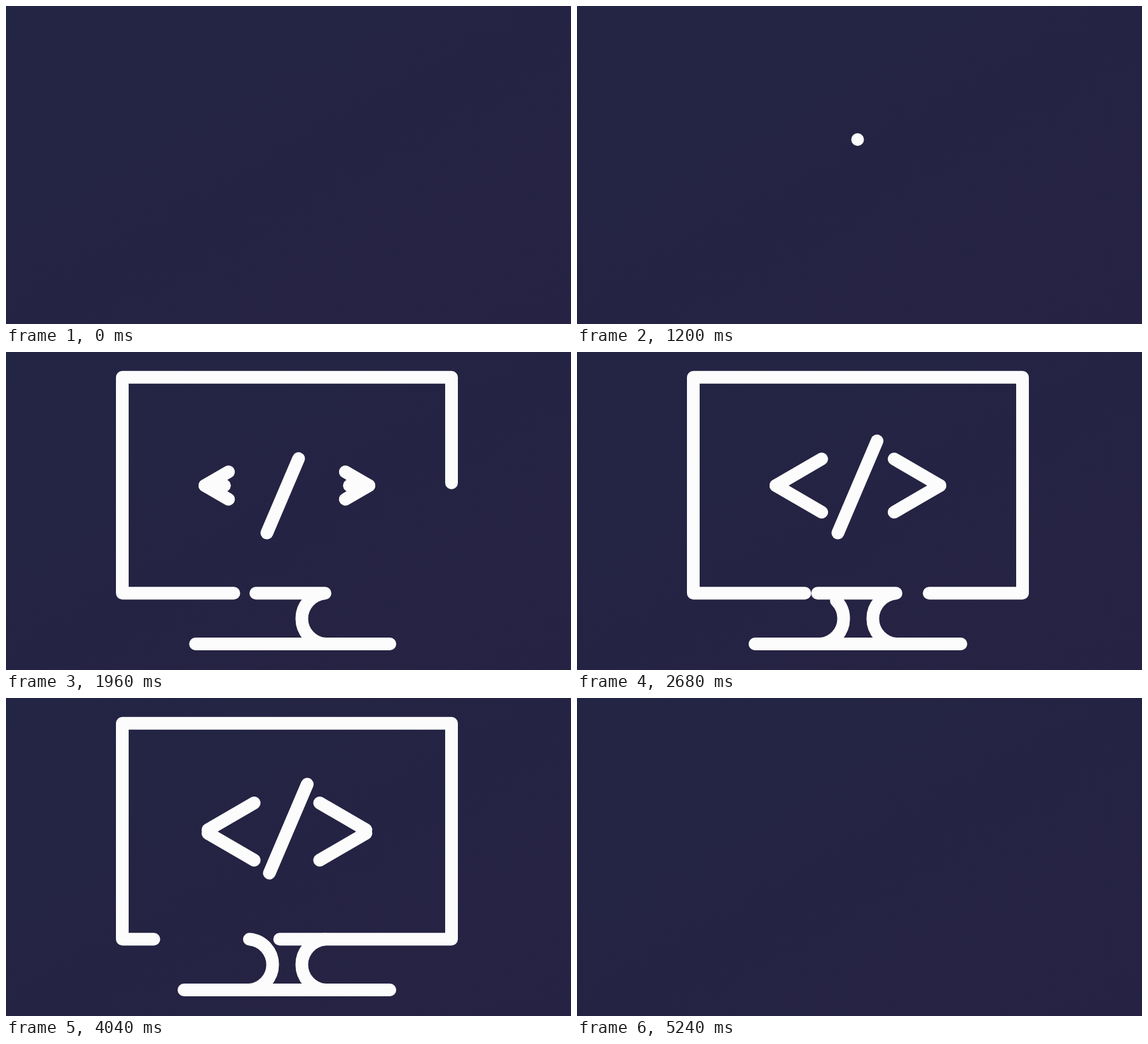
Recreate the animation shown at these times as an HTML page. Size 889 by 500 pixels, loop 6 s.

```html
<!DOCTYPE html>
<html lang="en">
<head>
<meta charset="utf-8">
<title>Code monitor</title>
<style>
  html, body { margin: 0; width: 100%; height: 100%; overflow: hidden; background: #252343; }
  svg { display: block; width: 100vw; height: 100vh; }
  .line { fill: none; stroke: #fcfcfc; stroke-width: 20; stroke-linecap: round; stroke-linejoin: round; }
</style>
</head>
<body>
<svg viewBox="0 0 889 500">
  <defs>
    <linearGradient id="bg" x1="0" y1="0" x2="1" y2="1">
      <stop offset="0" stop-color="#232544"/>
      <stop offset=".5" stop-color="#252343"/>
      <stop offset="1" stop-color="#262243"/>
    </linearGradient>
  </defs>
  <rect width="889" height="500" fill="url(#bg)"/>
  <circle id="dot" cy="210" r="10" fill="#fcfcfc"/>
  <g id="lines"></g>
</svg>
<script>
const LOOP = 6000, STEP = 40;
const DRAW = 1300, ERASE = 3280, SPAN = 1960;
const REST_X = 441.5, ENTER_X = 899;
const dot = document.getElementById('dot');
const group = document.getElementById('lines');

const clamp = x => Math.min(1, Math.max(0, x));
const curve = (s, a, b) => 3 * s * (1 - s) ** 2 * a + 3 * s * s * (1 - s) * b + s ** 3;

// Fast start, long settle
function easeOut(u) {
  if (u <= 0) return 0;
  if (u >= 1) return 1;
  let lo = 0, hi = 1;
  for (let i = 0; i < 24; i++) {
    const mid = (lo + hi) / 2;
    if (curve(mid, .12, .2) < u) lo = mid; else hi = mid;
  }
  return curve(lo, .4, 1);
}
const easeIn = u => 1 - easeOut(1 - u);
const bend = (p, k) => p + k * p * (1 - p);

function addLine(d, draw, erase) {
  const el = document.createElementNS('http://www.w3.org/2000/svg', 'path');
  el.setAttribute('class', 'line');
  el.setAttribute('d', d);
  group.append(el);
  return { el, len: el.getTotalLength(), draw, erase };
}

// draw(p, len) gives [from, to] along the path; erase(e, len) gives from
const simpleDraw = (p, len) => [0, len * bend(p, .12)];
const simpleErase = (e, len) => len * e;

const ARM = 129;
const armDraw = (p, len) => [ARM * p, len * bend(p, .13)];
const armErase = (e, len) => ARM + (len - ARM) * e;

const LEAD = 72;
function standDraw(p, len) {
  const q = p - 1.7 * (p * (1 - p)) ** 2;
  return [LEAD * (1 - p), LEAD + (len - LEAD) * q];
}

const lines = [
  addLine('M358.5 379.3H183V39.7H701V379.3H502', (p, len) => [0, len * p], (e, len) => len * bend(e, .33)),
  addLine('M376 379.3H502A40 40 0 0 0 502 459H604H280H383A40 40 0 0 0 383 379.3', standDraw, simpleErase),
  addLine('M410.5 284.5L474 135.5', simpleDraw, simpleErase)
];
for (const side of [-1, 1]) {
  for (const up of [-1, 1]) {
    const tip = 442 + side * ARM, end = 442 + side * 51.5;
    lines.push(addLine(`M442 210H${tip}L${end} ${210 + up * 45}`, armDraw, armErase));
  }
}

function render(t) {
  const enter = easeOut((t - 60) / 970);
  dot.setAttribute('cx', ENTER_X + (REST_X - ENTER_X) * enter);
  dot.style.display = t >= 80 && t < DRAW ? '' : 'none';

  group.style.display = t >= DRAW && t < ERASE + SPAN ? '' : 'none';
  const p = easeOut(clamp((t - DRAW) / SPAN));
  const e = easeIn(clamp((t - ERASE) / SPAN));
  for (const { el, len, draw, erase } of lines) {
    let [from, to] = draw(p, len);
    if (t >= ERASE) from = erase(e, len);
    el.setAttribute('stroke-dasharray', `${Math.max(.01, to - from)} 9999`);
    el.setAttribute('stroke-dashoffset', -from);
  }
}

const start = performance.now();
function tick() {
  const t = (performance.now() - start) % LOOP;
  render(Math.floor(t / STEP) * STEP);
  requestAnimationFrame(tick);
}
tick();
</script>
</body>
</html>
```
